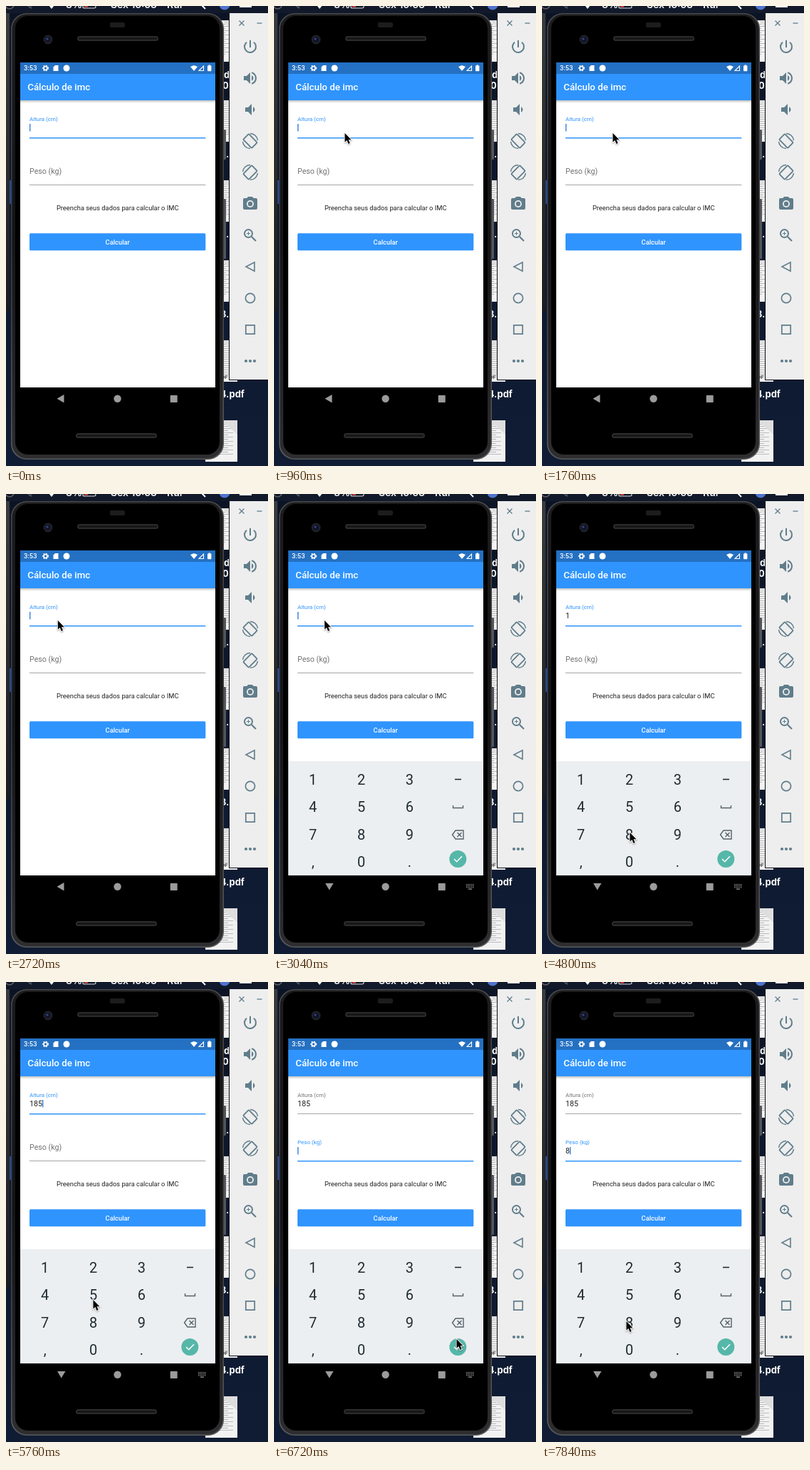
An HTML page with a canvas for the animation above (8 s loop, 368 by 644 pixels).

```html
<!DOCTYPE html>
<html lang="pt">
<head>
<meta charset="utf-8">
<title>Cálculo de imc</title>
<style>
  html, body { margin: 0; width: 100%; height: 100%; overflow: hidden; background: #0c1729; }
  canvas { display: block; }
</style>
</head>
<body>
<canvas id="stage" width="368" height="644"></canvas>
<script>
const ctx = document.getElementById('stage').getContext('2d');
const LOOP = 8000, STEP = 160, BLINK = 500;
const BLUE = '#2f94fd', SLATE = '#607d8b', GREY = '#737373', INK = '#212121';
const FULL = Math.PI * 2, QUARTER = Math.PI / 2;

const TAP = 2600, NEXT = 6560;
const HEIGHT_KEYS = [{ at: 4160, key: '1' }, { at: 4960, key: '8' }, { at: 5440, key: '5' }];
const WEIGHT_KEYS = [{ at: 7520, key: '8' }];
const CARET_RESETS = [-260, TAP, NEXT, ...[...HEIGHT_KEYS, ...WEIGHT_KEYS].map(k => k.at)];

// Pointer moves: start, end, target
const keyAt = (col, row) => [56 + col * 67, 398 + row * 38];
const MOVES = [
  [160, 960, [99, 178]],
  [2240, 3040, [70.5, 177]],
  [3200, 3360, [112, 286]],
  [3680, 4000, keyAt(0, 0)],
  [4320, 4720, keyAt(1, 2)],
  [4960, 5280, [122, 445]],
  [5920, 6400, [256, 500]],
  [6880, 7360, [118, 475]]
];

const clamp = v => Math.max(0, Math.min(1, v));
const mix = (a, b, k) => a + (b - a) * k;
const easeOut = k => 1 - (1 - k) ** 3;
const typed = (keys, t) => keys.filter(k => t >= k.at).map(k => k.key).join('');

function box(x, y, w, h, fill, r = 0) {
  ctx.fillStyle = fill;
  ctx.beginPath();
  ctx.roundRect(x, y, w, h, r);
  ctx.fill();
}
function frame(x, y, w, h, color, width, r = 0) {
  ctx.beginPath();
  ctx.roundRect(x, y, w, h, r);
  ctx.strokeStyle = color;
  ctx.lineWidth = width;
  ctx.stroke();
}
function disc(x, y, r, fill) {
  ctx.fillStyle = fill;
  ctx.beginPath();
  ctx.arc(x, y, r, 0, FULL);
  ctx.fill();
}
function ring(x, y, r, color, width, from = 0, to = FULL) {
  ctx.beginPath();
  ctx.arc(x, y, r, from, to);
  ctx.strokeStyle = color;
  ctx.lineWidth = width;
  ctx.stroke();
}
function trace(points, closed) {
  ctx.beginPath();
  points.forEach(([x, y]) => ctx.lineTo(x, y));
  if (closed) ctx.closePath();
}
function poly(points, fill) {
  trace(points, true);
  ctx.fillStyle = fill;
  ctx.fill();
}
function line(points, color, width, closed) {
  trace(points, closed);
  ctx.strokeStyle = color;
  ctx.lineWidth = width;
  ctx.stroke();
}
function cross(x, y, r, color, width) {
  line([[x - r, y - r], [x + r, y + r]], color, width);
  line([[x - r, y + r], [x + r, y - r]], color, width);
}
function text(str, x, y, size, color, weight = 400, align = 'left', family = 'Roboto') {
  ctx.font = `${weight} ${size}px ${family}, sans-serif`;
  ctx.textAlign = align;
  ctx.fillStyle = color;
  ctx.fillText(str, x, y);
}
function fade(y0, y1, ...colors) {
  const g = ctx.createLinearGradient(0, y0, 0, y1);
  colors.forEach((c, i) => g.addColorStop(i / (colors.length - 1), c));
  return g;
}
function at(x, y, draw) {
  ctx.save();
  ctx.translate(x, y);
  draw();
  ctx.restore();
}

function drawMenuBar() {
  const label = (s, x) => text(s, x, 2.5, 14, '#f4f4f4', 600, 'left', 'Inter');
  box(0, 0, 368, 10, '#11192a');
  ring(5, -2, 6, '#666', 1.5);
  line([[31, 0], [35, 3], [35, -2]], '#596170', 1.2);
  poly([[60, -1], [68, -1], [64, 4]], '#fff');
  label('8%', 84);
  frame(108, -8, 18, 11, '#ddd', 1.2, 2);
  box(110, -2, 5, 3.5, '#f0443b');
  label('Sex 15:53', 147);
  label('Rui', 226);
  line([[275, -1], [280, 4]], '#fff', 2);
  disc(307, -2, 7.5, '#4f74cf');
  box(328, 0, 17, 2, '#eee');
}

function drawDesktop() {
  box(0, 0, 368, 644, fade(0, 644, '#0b1424', '#0d1930', '#101c33'));
  box(0, 10, 5, 417, fade(10, 427, '#3a3b3e', '#2b2c2f', '#1b1c20'));
  box(5, 244, 3, 33, '#1c4aa5');

  const name = (s, x, y, align) => text(s, x, y, 13, '#fff', 700, align, 'Inter');
  for (let i = 0; i < 6; i++) {
    const y = 20 + i * 112;
    box(280, y, 45, 58, '#f2f2f2');
    for (let j = 0; j < 15; j++)
      box(284, y + 5 + j * 3, 24 + (j * 7 + i * 5) % 14, .8, '#a9a9a9');
    poly([[303, y], [325, y], [325, y + 20]], '#dedede');
    if (i) name(i + '.pdf', 335, y + 80, 'right');
  }
  name('d', 306, 101);
  name('0', 304, 116);
  text('PDF', 312, 522, 8, '#444', 500, 'right');
}

function drawPhone() {
  box(304, 173, 5, 42, '#55565a', 1.5);
  box(304, 270, 5, 84, '#55565a', 1.5);
  box(7, 10, 299, 625, fade(10, 635, '#4a4a4c', '#3c3c3e', '#5a5a5c'), 22);
  box(8.5, 11.5, 296, 622, fade(10, 635, '#1c1c1e', '#141416', '#2e2e30'), 21);
  box(13, 14, 287, 614, '#000', 18);
  box(146, 23, 21, 7, '#1d1d1e', 2);
  for (const [x, y] of [[100, 42], [98, 598]]) {
    box(x, y, 114, 7, '#2c2c2d', 3.5);
    box(x + 2, y + 2, 110, 3, '#171718', 1.5);
  }
  disc(59, 47, 6.5, '#202127');
  disc(59, 47, 4, '#10142c');
  disc(58, 46, 1.6, '#39447e');
}

function drawStatusBar() {
  box(20, 79, 274, 16, '#2470c2');
  text('3:53', 25, 90.3, 9.4, '#fff', 500);
  ctx.setLineDash([1.7, 1.7]);
  ring(55.5, 87, 3.6, '#fff', 1.6);
  ctx.setLineDash([]);
  ring(55.5, 87, 2.5, '#fff', 1.7);
  poly([[69, 83], [73.5, 83], [73.5, 91], [66.5, 91], [66.5, 85.5]], '#fff');
  disc(85, 87, 4.5, '#fff');
  poly([[259, 85], [264, 83], [269, 85], [264, 91]], '#fff');
  line([[271, 90.5], [277.5, 90.5], [277.5, 84]], '#fff', 1.1, true);
  box(283, 83.5, 5.4, 7.8, '#fff', .7);
  box(284.6, 82.4, 2.2, 2, '#fff');
}

// Text field whose hint floats up as k goes from 0 to 1
function drawField(label, value, y, k, focused, caret) {
  text(label, 33, mix(y - 15, y - 23, k), mix(10.67, 8, k), focused ? BLUE : GREY);
  text(value, 33, y - 10, 10.67, INK);
  if (focused && caret) box(33 + ctx.measureText(value).width, y - 19, 1.4, 10.5, '#3c7fd8');
  box(33, y, 247.3, focused ? 1.4 : 1, focused ? BLUE : '#a6a6a6');
}

function drawApp(t) {
  const reset = Math.max(...CARET_RESETS.filter(r => r <= t));
  const caret = Math.floor((t - reset) / BLINK) % 2 === 0;
  const next = t >= NEXT;

  box(20, 132, 274, 402, '#fff');
  box(20, 132, 274, 4, fade(132, 136, 'rgba(0,0,0,.24)', 'rgba(0,0,0,0)'));
  box(20, 95, 274, 37, BLUE);
  drawStatusBar();
  text('Cálculo de imc', 30.2, 118, 13.33, '#fff', 500);
  drawField('Altura (cm)', typed(HEIGHT_KEYS, t), 184, 1, !next, caret);
  drawField('Peso (kg)', typed(WEIGHT_KEYS, t), 250, easeOut(clamp((t - NEXT) / 200)), next, caret);
  text('Preencha seus dados para calcular o IMC', 156.7, 286, 9.33, INK, 400, 'center');
  box(33, 318.3, 247.3, 24, BLUE, 1.5);
  text('Calcular', 156.7, 333.7, 9.33, '#fff', 500, 'center');
}

function drawKeyboard(shown) {
  const ink = '#202c33', soft = '#56636a';
  ctx.save();
  ctx.beginPath();
  ctx.rect(20, 374, 274, 160);
  ctx.clip();
  ctx.translate(0, 160 * (1 - shown));
  box(20, 374, 274, 160, '#eceff1');
  ['123', '456', '789', ',0.'].forEach((row, r) =>
    [...row].forEach((key, c) =>
      text(key, 54.7 + c * 67.8, 406.5 + r * 38.6, 20, ink, 400, 'center')));
  box(254, 398.7, 9, 1.6, ink);
  line([[251.5, 436], [251.5, 439.5], [265.5, 439.5], [265.5, 436]], soft, 1.4);
  line([[250.5, 477], [255, 471], [266, 471], [266, 483], [255, 483]], soft, 1.4, true);
  cross(260.5, 477, 3, soft, 1.4);
  disc(258.3, 511, 12, '#56b7a9');
  line([[253, 511], [256.7, 514.7], [264, 507.3]], '#fff', 1.5);
  ctx.restore();
}

function drawNav(open) {
  const grey = '#9b9b9b';
  poly(open ? [[72, 545], [83.5, 545], [77.7, 554.5]] : [[71.5, 549.7], [81.5, 544], [81.5, 555.5]], grey);
  disc(156.6, 549.8, 5.2, grey);
  box(230.7, 545, 10, 10, grey, .8);
  if (!open) return;
  for (let i = 0; i < 15; i++)
    box(270 + i % 5 * 2.3, 546 + Math.floor(i / 5) * 2.1, 1.3, 1.2, grey);
  box(273, 552.5, 5, 1.2, grey);
}

function powerIcon() {
  ring(0, 0, 8, SLATE, 2, -.9, Math.PI + .9);
  box(-1, -9, 2, 10, SLATE);
}
function volumeIcon(x, waves) {
  poly([[x, -3], [x + 4, -3], [x + 9, -8], [x + 9, 8], [x + 4, 3], [x, 3]], SLATE);
  poly([[x + 11, -4], [x + 13, -2], [x + 13.5, 0], [x + 13, 2], [x + 11, 4]], SLATE);
  if (waves) ring(x + 9, 0, 8, SLATE, 2, -1.3, 1.3);
}
function rotateIcon(side) {
  ctx.scale(side, 1);
  ring(0, 0, 10.5, SLATE, 1.5, -QUARTER, -.1);
  ring(0, 0, 10.5, SLATE, 1.5, QUARTER, Math.PI - .1);
  ctx.rotate(QUARTER / 2);
  frame(-8.5, -5.5, 17, 11, SLATE, 1.8, 1.2);
}
function cameraIcon() {
  box(-10, -8, 20, 16, SLATE, 2);
  poly([[-5.5, -7], [-3, -10], [3, -10], [5.5, -7]], SLATE);
  disc(0, 0, 5, '#eee');
  disc(0, 0, 3.2, SLATE);
}
function zoomIcon() {
  ring(-2.5, -2.5, 5.5, SLATE, 2);
  line([[2, 2], [8, 8]], SLATE, 2.2);
  box(-5, -3, 5, 1, SLATE);
  box(-3, -5, 1, 5, SLATE);
}

function drawToolbar() {
  box(313, 10, 55, 514, '#0a0d14');
  box(314, 10, 54, 513, '#eeeeee');
  cross(331, 24, 3.5, SLATE, 1.3);
  box(352.5, 23.4, 7, 1.3, SLATE);
  const icons = [
    powerIcon,
    () => volumeIcon(-9, true),
    () => volumeIcon(-7, false),
    () => rotateIcon(1),
    () => rotateIcon(-1),
    cameraIcon,
    zoomIcon,
    () => line([[-6, 0], [6, -6.3], [6, 6.3]], SLATE, 1.6, true),
    () => ring(0, 0, 6.6, SLATE, 1.7),
    () => frame(-6.2, -6.2, 12.4, 12.4, SLATE, 1.7),
    () => [-6, 0, 6].forEach(x => disc(x, 0, 2.1, SLATE))
  ];
  icons.forEach((draw, i) => at(343, 57 + i * 44, draw));
}

function drawPointer(t) {
  if (t < MOVES[0][0]) return;
  let x = 190, y = -18;
  for (const [from, to, [tx, ty]] of MOVES) {
    const k = easeOut(clamp((t - from) / (to - from)));
    x = mix(x, tx, k);
    y = mix(y, ty, k);
  }
  const arrow = [[0, 0], [0, 12.6], [2.9, 10], [5, 15], [7.2, 14], [5.1, 9.2], [9, 9.2]];
  at(x + .5, y, () => {
    ctx.shadowColor = 'rgba(0,0,0,.35)';
    ctx.shadowBlur = 2;
    ctx.shadowOffsetY = 1;
    line(arrow, '#fff', 1.8, true);
    ctx.shadowColor = 'transparent';
    poly(arrow, '#000');
  });
}

function render(now) {
  const t = Math.floor(now % LOOP / STEP) * STEP;
  const shown = clamp((t - 2720) / 320);
  drawDesktop();
  drawMenuBar();
  drawPhone();
  drawApp(t);
  if (shown) drawKeyboard(shown);
  drawNav(shown > 0);
  drawToolbar();
  drawPointer(t);
}

const start = performance.now();
function tick() {
  render(performance.now() - start);
  requestAnimationFrame(tick);
}
tick();
</script>
</body>
</html>
```
